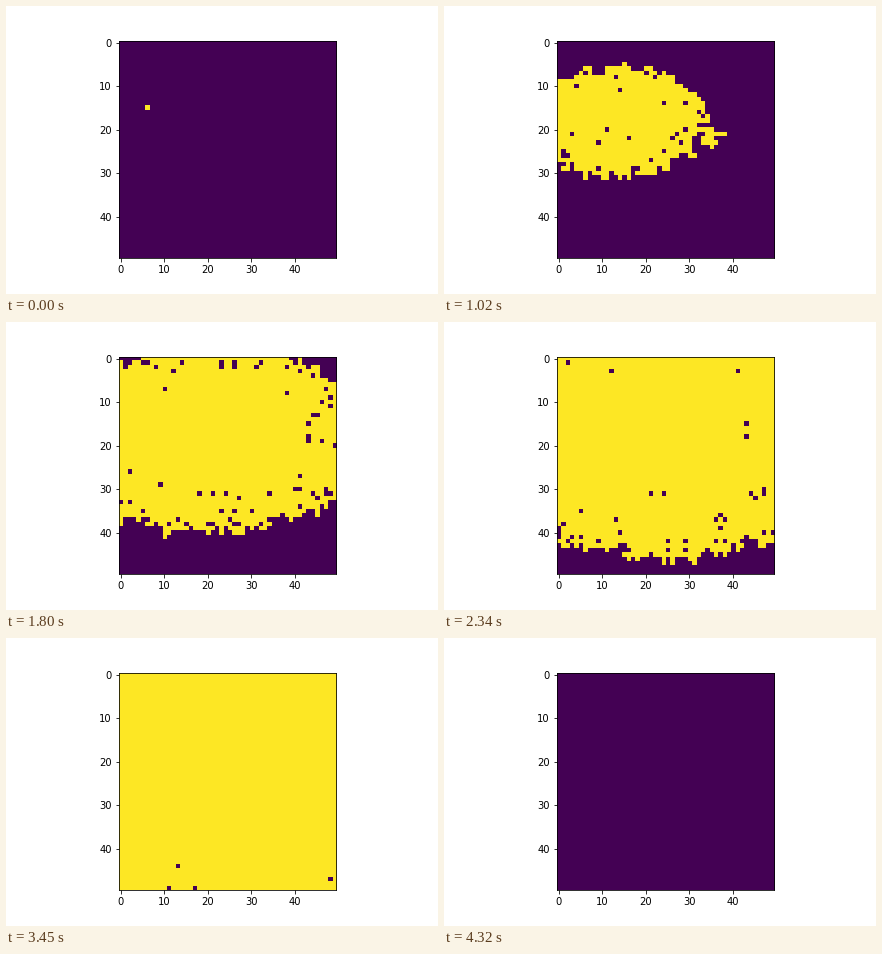
Write a matplotlib script that moves like this. It is 432 px wide and 288 px high and loops after 6.2 s.

```python
import numpy as np
import matplotlib.pyplot as plt
from matplotlib.animation import FuncAnimation

SIZE = 50
LOOP, INTERVAL, STEP = 6200, 20, 30
SEED_X, SEED_Y = 6, 15
LAST_STEP = 144

rng = np.random.default_rng(12)
rows, cols = np.mgrid[:SIZE, :SIZE]


def front_times():
    """Arrival of a growing oval that drifts right and slows downwards."""
    times = np.full((SIZE, SIZE), 108.0)
    for t in np.arange(108, 0, -0.5):
        dx = (cols - SEED_X - 0.25 * t) / (0.63 * t)
        dy = rows - SEED_Y - 0.07 * t
        up = 0.36 * t
        down = 1.07 * t ** 0.77 - 0.07 * t
        dy = dy / np.where(dy < 0, up, down)
        times[dx ** 2 + dy ** 2 <= 1] = t
    return times


def roughen(times):
    """Fray the front; some cells resist for much longer."""
    jitter = rng.normal(-1, 4, times.shape) * np.minimum(1, times / 20)
    resists = rng.random(times.shape) < 0.15
    delay = rng.exponential(12, times.shape)
    return np.maximum(times + jitter + resists * delay, 1)


def connect(times):
    """Let a cell change only after one of its neighbours."""
    for _ in range(40):
        p = np.pad(times, 1, constant_values=999)
        near = np.minimum.reduce(
            [p[:-2, 1:-1], p[2:, 1:-1], p[1:-1, :-2], p[1:-1, 2:]])
        times = np.maximum(times, near + 0.5)
        times[SEED_Y, SEED_X] = 0
    return times


def settle(times, start=100):
    """Scale the late phase so that the final cell falls on the last step."""
    scale = (LAST_STEP - start) / (times.max() - start)
    return np.where(times > start, start + (times - start) * scale, times)


times = settle(connect(roughen(front_times())))

fig = plt.figure(figsize=(6, 4), dpi=72, facecolor="white")
fig.subplots_adjust(left=0.125, right=0.9, bottom=0.125, top=0.88)
ax = fig.add_subplot()
image = ax.imshow(times <= 0, cmap="viridis", interpolation="nearest")


def update(i):
    step = (i * INTERVAL + INTERVAL // 2) // STEP
    # The small margin absorbs rounding in the scaled times.
    image.set_data((times <= step + 1e-6).astype(float))
    image.autoscale()  # a uniform grid falls back to the dark colour
    return [image]


anim = FuncAnimation(fig, update, frames=LOOP // INTERVAL, interval=INTERVAL,
                     repeat=True, repeat_delay=0)
plt.show()
```
